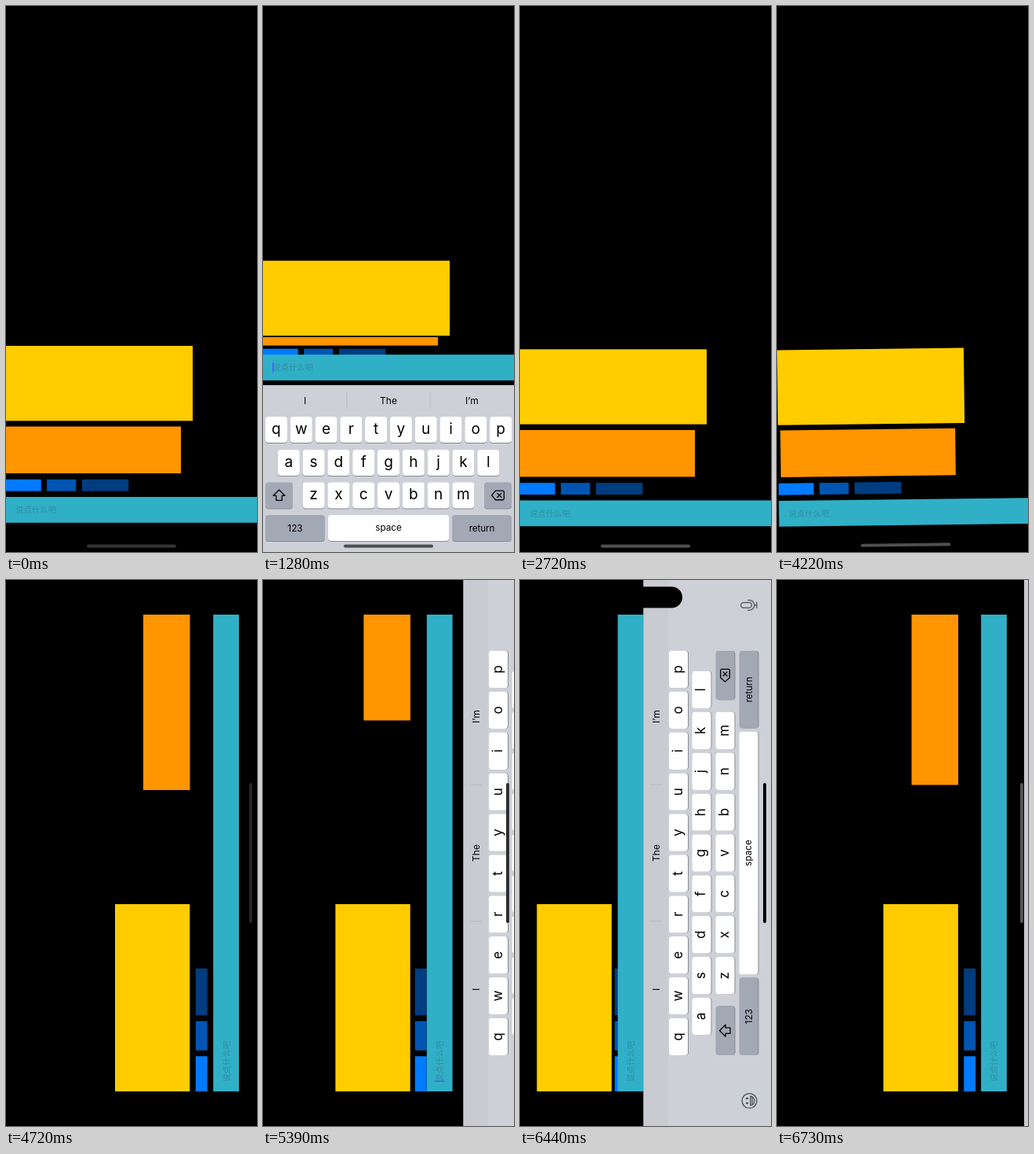
An HTML page with a canvas for the animation above (6780 ms loop, 320 px wide and 694 px high).

```html
<!DOCTYPE html>
<html lang="zh-CN">
<head>
<meta charset="utf-8">
<title>Keyboard avoidance</title>
<style>
html, body { margin: 0; width: 100%; height: 100%; overflow: hidden; background: #000; }
canvas { display: block; width: 320px; height: 694px; }
</style>
</head>
<body>
<canvas id="stage"></canvas>
<script>
const LOOP = 6780, TICK = 1000 / 18;
const canvas = document.getElementById('stage');
const ctx = canvas.getContext('2d');
const dpr = window.devicePixelRatio || 1;
canvas.width = 320 * dpr;
canvas.height = 694 * dpr;

// Layouts: y positions of the parts in interface coordinates
const portrait = { w: 320, h: 694, left: 0, yellow: 432, ox: 0, oy: 534.5, ow: 223, oh: 59.5,
  blue: 601.7, bar: 624, barW: 320, home: 114, homeY: 9.5 };
const portraitTyping = { ...portrait, yellow: 300, oy: 396, oh: 0, blue: 399.3, bar: 403.5 };
const portraitAfter = { ...portrait, yellow: 436.4, oy: 539, blue: 606.2, bar: 628.5 };
const landscape = { w: 694, h: 320, left: 44, yellow: 139, ox: 427, oy: 175, ow: 223, oh: 59.5,
  blue: 241.8, bar: 264.2, barW: 606, home: 178, homeY: 10 };
const landscapeTyping = { ...landscape, yellow: 21.5, ox: 650, oy: 57.5, ow: 0, blue: 120.7, bar: 124.6 };

const tallKeys = { w: 320, h: 258.5, edge: 3, rows: [40, 82, 123.5, 165], keyH: 33, keyW: 28, pitch: 31.8,
  sideW: 35, cornerW: 76, base: 21.7, label: 20.7, font: 19, words: 23.6, wordW: 106.4, lineH: 20,
  strip: '#cdd0d7', stripH: 38, iconX: 31.5, iconY: 228 };
const wideKeys = { w: 694, h: 162.5, edge: 90, rows: [32.5, 62, 92, 122], keyH: 24, keyW: 47.4, pitch: 51.9,
  sideW: 62.5, cornerW: 98.5, base: 16.7, label: 16.3, font: 17, words: 20.5, wordW: 173.4, lineH: 14,
  strip: '#cacbd1', stripH: 31, iconX: 32, iconY: 135 };

const clamp = v => Math.min(1, Math.max(0, v));
const lerp = (a, b, p) => a + (b - a) * p;
const mix = (a, b, p) => Object.fromEntries(Object.keys(a).map(k => [k, lerp(a[k], b[k], p)]));
const smooth = p => p * p * (3 - 2 * p);

// Critically damped spring of the system keyboard
function spring(ms) {
  const x = Math.max(0, ms) * 0.01826;
  return 1 - (1 + x) * Math.exp(-x);
}

function track(points, t) {
  for (let i = 1; i < points.length; i++) {
    const [t0, a] = points[i - 1], [t1, b] = points[i];
    if (t < t1) return lerp(a, b, clamp((t - t0) / (t1 - t0)));
  }
  return points[points.length - 1][1];
}

const homeGray = [[0, 52], [1160, 52], [1280, 78], [1500, 0], [2200, 0], [2450, 80], [4220, 80],
  [4500, 40], [5105, 40], [5106, 44], [5400, 44], [5600, 0], [6500, 0], [6720, 85]];
const caretAlpha = [[1050, 0], [1055, 1], [1630, 1], [1775, 0], [1960, 0], [2110, 1], [2150, 1], [2151, 0],
  [5325, 0], [5330, 1], [6120, 1], [6275, 0]];

function rect(color, x, y, w, h) {
  ctx.fillStyle = color;
  ctx.fillRect(x, y, w, h);
}

function pill(color, x, y, w, h, r) {
  ctx.fillStyle = color;
  ctx.beginPath();
  ctx.roundRect(x, y, w, h, r);
  ctx.fill();
}

function text(str, x, y, size, color = '#000') {
  ctx.font = `${size}px Inter, sans-serif`;
  ctx.textAlign = 'center';
  ctx.fillStyle = color;
  ctx.fillText(str, x, y);
}

function icon(x, y, color, width, path) {
  ctx.save();
  ctx.translate(x, y);
  ctx.strokeStyle = ctx.fillStyle = color;
  ctx.lineWidth = width;
  ctx.lineJoin = ctx.lineCap = 'round';
  path();
  ctx.restore();
}

const stroke = d => ctx.stroke(new Path2D(d));

function smiley() {
  stroke('M9.4 0A9.4 9.4 0 1 1 -9.4 0A9.4 9.4 0 1 1 9.4 0Z');
  stroke('M-5.8 1.3H5.8C5.5 8-5.5 8-5.8 1.3ZM-5 3.6H5');
  for (const side of [-3, 3]) {
    ctx.beginPath();
    ctx.ellipse(side, -3, 1.2, 1.7, 0, 0, 7);
    ctx.fill();
  }
}

function microphone() {
  stroke('M-3.3-6.5A3.3 3.3 0 0 1 3.3-6.5V0.5A3.3 3.3 0 0 1-3.3 0.5Z');
  stroke('M-6.3-1V1A6.3 6.3 0 0 0 6.3 1V-1M0 7.3V10.3M-3.5 10.3H3.5');
}

function keyboard(k, top) {
  const white = '#fff', gray = '#a2a8b4', ink = '#50555d';
  ctx.save();
  ctx.translate(0, top);
  rect('#cdd0d7', 0, 0, k.w, k.h + 5);
  rect(k.strip, 0, 0, k.w, k.stripH);

  ['I', 'The', 'I’m'].forEach((word, i) => {
    const x = k.w / 2 + (i - 1) * k.wordW;
    text(word, x, k.words, 12);
    if (i) rect('#b5b9c1', x - k.wordW / 2 - 0.5, 9, 1, k.lineH);
  });

  const key = (x, row, w, color) => {
    pill('#898b91', x, k.rows[row] + 1, w, k.keyH, 4);
    pill(color, x, k.rows[row], w, k.keyH, 4);
  };

  ['qwertyuiop', 'asdfghjkl', 'zxcvbnm'].forEach((letters, row) => {
    const start = (k.w - letters.length * k.pitch + k.pitch - k.keyW) / 2;
    [...letters].forEach((letter, i) => {
      const x = start + i * k.pitch;
      key(x, row, k.keyW, white);
      text(letter, x + k.keyW / 2, k.rows[row] + k.base, k.font);
    });
  });

  const right = k.w - k.edge, mid = k.rows[2] + k.keyH / 2;
  key(k.edge, 2, k.sideW, gray);
  key(right - k.sideW, 2, k.sideW, gray);
  icon(k.edge + k.sideW / 2, mid, '#000', 1.3, () =>
    stroke('M0-7L7.5 0.5H3.7V6.5H-3.7V0.5H-7.5Z'));
  icon(right - k.sideW / 2, mid, '#000', 1.3, () =>
    stroke('M-8 0L-3-5.8H6Q7.8-5.8 7.8-4V4Q7.8 5.8 6 5.8H-3ZM-0.8-2.6L4.4 2.6M4.4-2.6L-0.8 2.6'));

  const y = k.rows[3] + k.label;
  key(k.edge, 3, k.cornerW, gray);
  key(k.edge + k.cornerW + 4, 3, right - k.edge - 2 * k.cornerW - 8, white);
  key(right - k.cornerW, 3, k.cornerW, gray);
  text('123', k.edge + k.cornerW / 2, y, 11.8);
  text('space', k.w / 2, y - 0.5, 11.7);
  text('return', right - k.cornerW / 2, y, 11.5);

  icon(k.iconX, k.iconY, ink, 1.4, smiley);
  icon(k.w - k.iconX, k.iconY - 1, ink, 1.3, microphone);
  ctx.restore();
}

function drawContent(s, t) {
  rect('#ffcc00', s.left, s.yellow, 238, 95.3);
  rect('#ff9500', s.ox, s.oy, s.ow, s.oh);
  rect('#007aff', s.left, s.blue, 44.7, 14.9);
  rect('#0055b3', s.left + 52.1, s.blue, 37.2, 14.9);
  rect('#003d80', s.left + 96.8, s.blue, 59.5, 14.9);
  rect('#30b0c7', s.left, s.bar, s.barW, 32.8);

  ctx.font = '10.4px "Noto Sans CJK SC", "Noto Sans CJK", sans-serif';
  ctx.textAlign = 'left';
  ctx.fillStyle = 'rgba(60, 60, 67, 0.3)';
  ctx.fillText('说点什么吧', s.left + 12.2, s.bar + 20.3);

  ctx.globalAlpha = track(caretAlpha, t);
  rect('#4262f2', s.left + 12, s.bar + 9.8, 1.5, 13.2);
  ctx.globalAlpha = 1;
}

function pose(t) {
  if (t < 2100) {
    const p = spring(t - 1106);
    return { s: mix(portrait, portraitTyping, p), p, turn: 0 };
  }
  if (t < 4200) {
    const p = 1 - spring(t - 2148.5);
    return { s: mix(portraitAfter, portraitTyping, p), p, turn: 0 };
  }
  if (t < 5300) {
    const turn = smooth(clamp((t - 4200) / 430));
    return { s: mix(portraitAfter, landscape, turn), p: 0, turn };
  }
  const p = t < 6400 ? spring(t - 5314) : 1 - spring(t - 6427);
  return { s: mix(landscape, landscapeTyping, p), p, turn: 1 };
}

function draw(t) {
  const { s, p, turn } = pose(t);
  ctx.setTransform(dpr, 0, 0, dpr, 0, 0);
  rect('#000', 0, 0, 320, 694);

  ctx.save();
  ctx.translate(160, 347);
  ctx.rotate(-Math.PI / 2 * turn);
  ctx.translate(-s.w / 2, -s.h / 2);
  drawContent(s, t);
  if (p > 0.001) {
    const keys = turn ? wideKeys : tallKeys;
    keyboard(keys, s.h - keys.h * p);
  }
  const g = Math.round(track(homeGray, t));
  pill(`rgb(${g}, ${g}, ${g})`, (s.w - s.home) / 2, s.h - s.homeY, s.home, 3.9, 2);
  ctx.restore();

  // camera cutout, fixed to the device
  pill('#000', 113, 8.5, 94, 27, 13.5);
}

const begin = performance.now();
function frame() {
  const t = (performance.now() - begin) % LOOP;
  draw(Math.floor((t + 3) / TICK) * TICK);
  requestAnimationFrame(frame);
}
frame();
</script>
</body>
</html>
```
